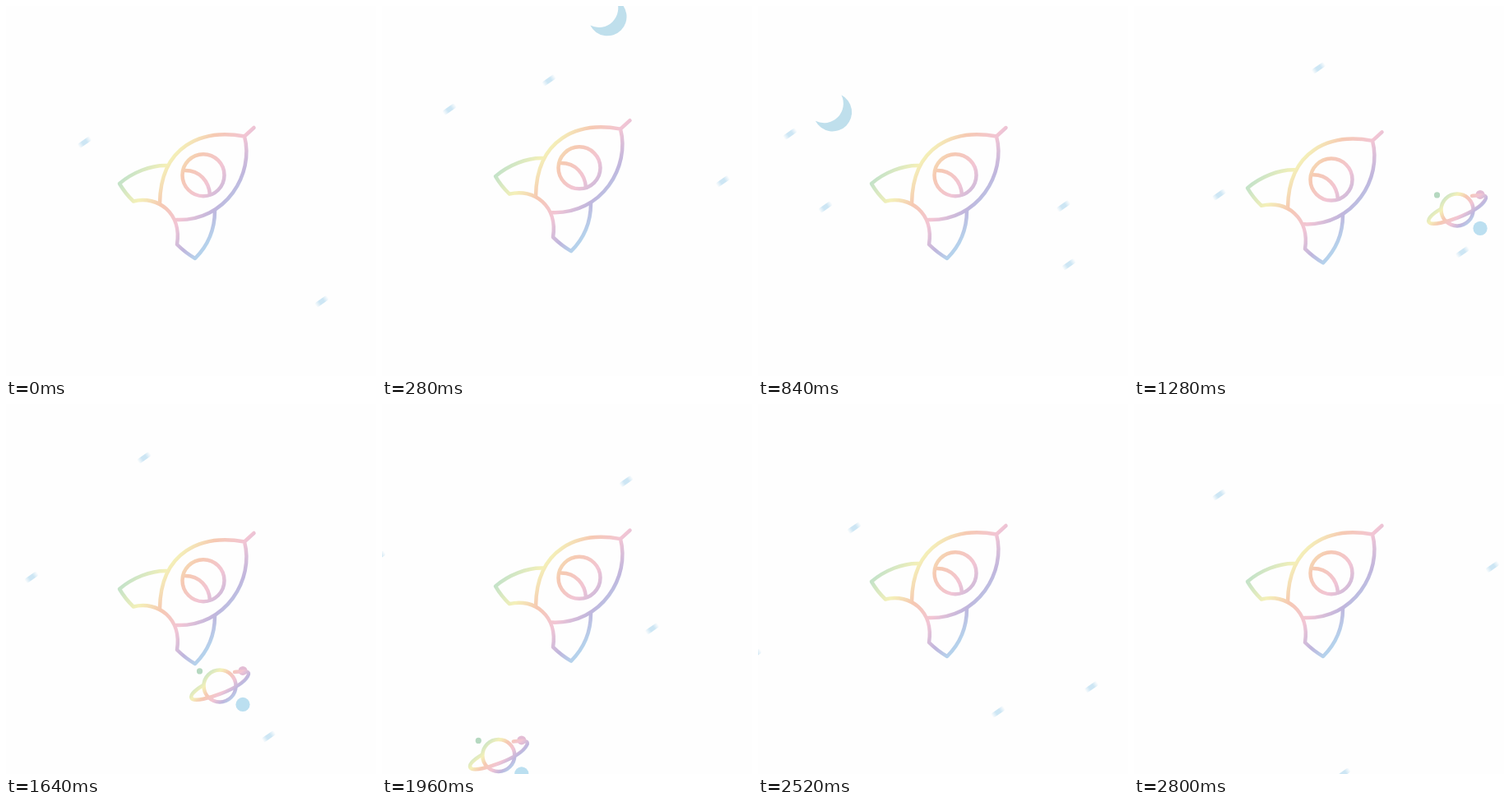
Recreate the animation shown at these times as an HTML page. Size 450 by 450 pixels, loop 2840 ms.

```html
<!DOCTYPE html>
<html lang="en">
<head>
<meta charset="utf-8">
<title>Rocket in space</title>
<style>
  html, body { margin: 0; height: 100%; overflow: hidden; background: #fefefe; }
  svg { display: block; width: 100%; height: 100%; }
  .line { fill: none; stroke-width: 4.5; stroke-linecap: round; stroke-linejoin: round; }
</style>
</head>
<body>
<svg viewBox="0 0 450 450">
  <defs>
    <linearGradient id="rainbow">
      <stop offset="0" stop-color="#c5e3c8"/>
      <stop offset=".24" stop-color="#f4f0b8"/>
      <stop offset=".43" stop-color="#f6c9b2"/>
      <stop offset=".66" stop-color="#f2c5d4"/>
      <stop offset=".86" stop-color="#c0b6dd"/>
      <stop offset="1" stop-color="#b5d2ec"/>
    </linearGradient>
    <linearGradient id="rocketInk" href="#rainbow" gradientUnits="userSpaceOnUse" x1="138" y1="216" x2="240" y2="295"/>
    <linearGradient id="planetInk" href="#rainbow" gradientUnits="userSpaceOnUse" x1="-17" y1="-17" x2="16" y2="16"/>
    <linearGradient id="glow">
      <stop offset="0" stop-color="#cde6f4" stop-opacity="0"/>
      <stop offset=".35" stop-color="#cde6f4"/>
      <stop offset=".65" stop-color="#cde6f4"/>
      <stop offset="1" stop-color="#cde6f4" stop-opacity="0"/>
    </linearGradient>
    <clipPath id="belowEdge"><rect y="35" width="450" height="415"/></clipPath>
  </defs>

  <g id="streaks"></g>
  <g id="clippedStreaks" clip-path="url(#belowEdge)"></g>

  <path id="moon" fill="#bfdfec" d="M10.5-21A23.4 23.4 0 1 1-21 10.5A23.5 23.5 0 0 0 10.5-21Z"/>

  <g id="planet">
    <circle cx="-24.5" cy="-18" r="3.6" fill="#b5d8c0"/>
    <circle cx="28" cy="22.5" r="8.6" fill="#bbdff0"/>
    <circle cx="28" cy="-18.5" r="5.5" fill="#e3bcd4"/>
    <g class="line" stroke="url(#planetInk)">
      <circle r="19.5"/>
      <path d="M-20-1C-32 6-38 13-33 16C-24 21 26 3 34-12C38-19 30-18 18-17"/>
    </g>
  </g>

  <g id="rocket" class="line" stroke="url(#rocketInk)">
    <path d="M301.5 148L290 158.5C238 149 188 170 187 240M290 158.5C302 204 268 262 207 260"/>
    <path d="M197 194C176 193 153 203 138 216Q145 228 155 237.5C185 230 214 252 208 290Q218 300 230 307C245 292 254 273 254 249"/>
    <circle cx="240" cy="205.7" r="25.5"/>
    <path d="M216 200C236 199 247 214 248 229.5"/>
  </g>
</svg>

<script>
const FRAME = 40, FRAMES = 71;
const byId = id => document.getElementById(id);
const place = (el, x, y, extra = '') => el.setAttribute('transform', `translate(${x} ${y})${extra}`);

// Each wave repeats these lanes: entry frame, x, y, life in frames, cut at the top edge
const lanes = [
  [-1, 375, -30, 18],
  [8, 470, 299, 12],
  [10, 275.5, -10, 14, true],
  [16, 479, 168, 12],
  [23, 297, 94, 15],
  [29, 464, 254, 11],
];
const waves = [-12, 0, 26, 52];

const streaks = waves.flatMap(wave => lanes.map(([entry, x, y, life, clipped]) => {
  const el = document.createElementNS('http://www.w3.org/2000/svg', 'rect');
  const look = { x: -9, y: -3, width: 18, height: 6, rx: 2.5, fill: 'url(#glow)' };
  for (const key in look) el.setAttribute(key, look[key]);
  byId(clipped ? 'clippedStreaks' : 'streaks').append(el);
  return { el, x, y, life, entry: entry + wave };
}));

// Vertical bob of the rocket: frame, offset
const bob = [[0, 0], [11, -12.5], [20.5, 0], [41, 9], [60, 0], [71, 0]];

function bobAt(frame) {
  const i = bob.findIndex(([end]) => frame < end);
  const [t0, y0] = bob[i - 1], [t1, y1] = bob[i];
  const eased = (1 - Math.cos(Math.PI * (frame - t0) / (t1 - t0))) / 2;
  return y0 + (y1 - y0) * eased;
}

function draw(frame) {
  for (const { el, x, y, life, entry } of streaks) {
    const age = frame - entry;
    el.style.display = age >= 0 && age <= life ? '' : 'none';
    place(el, x - 21.5 * age, y + 15.05 * age, ' rotate(-35)');
  }
  place(byId('moon'), 366 - 13.1 * frame, -45 + 8.3 * frame);
  place(byId('planet'), 866 - 14.78 * frame, -90 + 10.56 * frame);
  place(byId('rocket'), 0, bobAt(frame));
}

const start = performance.now();
function tick() {
  draw(Math.floor((performance.now() - start) / FRAME) % FRAMES);
  requestAnimationFrame(tick);
}
tick();
</script>
</body>
</html>
```
